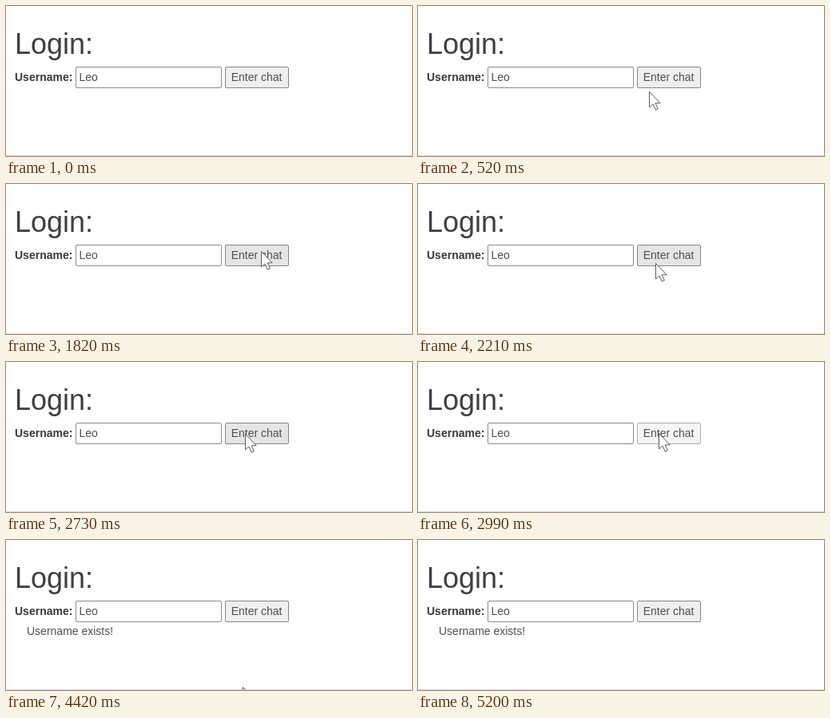
An HTML page for the animation above (5.46 s loop, 508 by 188 pixels).

```html
<!DOCTYPE html>
<html lang="en">
<head>
<meta charset="utf-8">
<title>Login</title>
<style>
  html, body { margin: 0; width: 100%; height: 100%; overflow: hidden; background: #fff; }
  svg { display: block; width: 508px; height: 188px; }
  text { font: 14px "Liberation Sans", Arial, sans-serif; fill: #505050; }
  .title { font-size: 36px; fill: #404040; }
  .label { font-weight: bold; fill: #3a3a3a; }
  .box { stroke: #8c8c8c; stroke-width: 1; }
</style>
</head>
<body>
<svg viewBox="0 0 508 188">
  <rect width="508" height="188" fill="#fff"/>
  <rect y="187" width="508" height="1" fill="#dcdcdc"/>
  <text class="title" x="11" y="60">Login:</text>
  <text class="label" x="11" y="94">Username:</text>
  <rect class="box" x="87.5" y="76.5" width="182" height="26" rx="1.5" fill="#fff"/>
  <text x="91.5" y="94">Leo</text>
  <rect id="button" class="box" x="274.5" y="76.5" width="79" height="26" rx="1.5"/>
  <text x="281.7" y="94">Enter chat</text>
  <text id="message" x="26" y="118.5">Username exists!</text>
  <path id="cursor" d="M0.5 0.5V20L5 16L8.2 23.2L11.3 21.9L8.2 14.8H14.2Z"
        fill="#fff" stroke="#5c5c5c" stroke-width="1" stroke-linejoin="round"/>
</svg>
<script>
  const LOOP = 5460, STEP = 130;
  const PRESS = 2990, RELEASE = 3120;
  const button = document.getElementById("button");
  const message = document.getElementById("message");
  const cursor = document.getElementById("cursor");

  // Places where the pointer rests; it glides from one to the next
  const stops = [
    { arrive: 0, leave: 0, x: 271, y: 192 },
    { arrive: 910, leave: 1820, x: 319, y: 84 },
    { arrive: 2210, leave: 2470, x: 297, y: 99 },
    { arrive: 2860, leave: 4030, x: 301, y: 89 },
    { arrive: 4550, leave: LOOP, x: 292, y: 192 }
  ];

  const easeIn = u => u ** 1.8;
  const easeOut = u => 1 - easeIn(1 - u);
  const mix = (a, b, k) => Math.round(a + (b - a) * k);

  function pointerAt(t) {
    const i = stops.findLastIndex(s => s.arrive <= t);
    const from = stops[i], to = stops[i + 1] || from;
    const u = t <= from.leave ? 0 : (t - from.leave) / (to.arrive - from.leave);
    return { x: mix(from.x, to.x, easeIn(u)), y: mix(from.y, to.y, easeOut(u)) };
  }

  const overButton = p => p.x >= 274 && p.x <= 354 && p.y >= 76 && p.y <= 102;

  function render(ms) {
    const t = Math.floor((ms % LOOP) / STEP) * STEP;
    const p = pointerAt(t);
    const pressed = t >= PRESS && t < RELEASE;
    button.style.fill = pressed ? "#f5f5f5" : overButton(p) ? "#e5e5e5" : "#efefef";
    button.style.stroke = pressed ? "#b0b0b0" : "#858585";
    message.style.visibility = t >= RELEASE ? "visible" : "hidden";
    cursor.setAttribute("transform", `translate(${p.x} ${p.y})`);
  }

  const start = performance.now();
  function tick() {
    render(performance.now() - start);
    requestAnimationFrame(tick);
  }
  tick();
</script>
</body>
</html>
```
